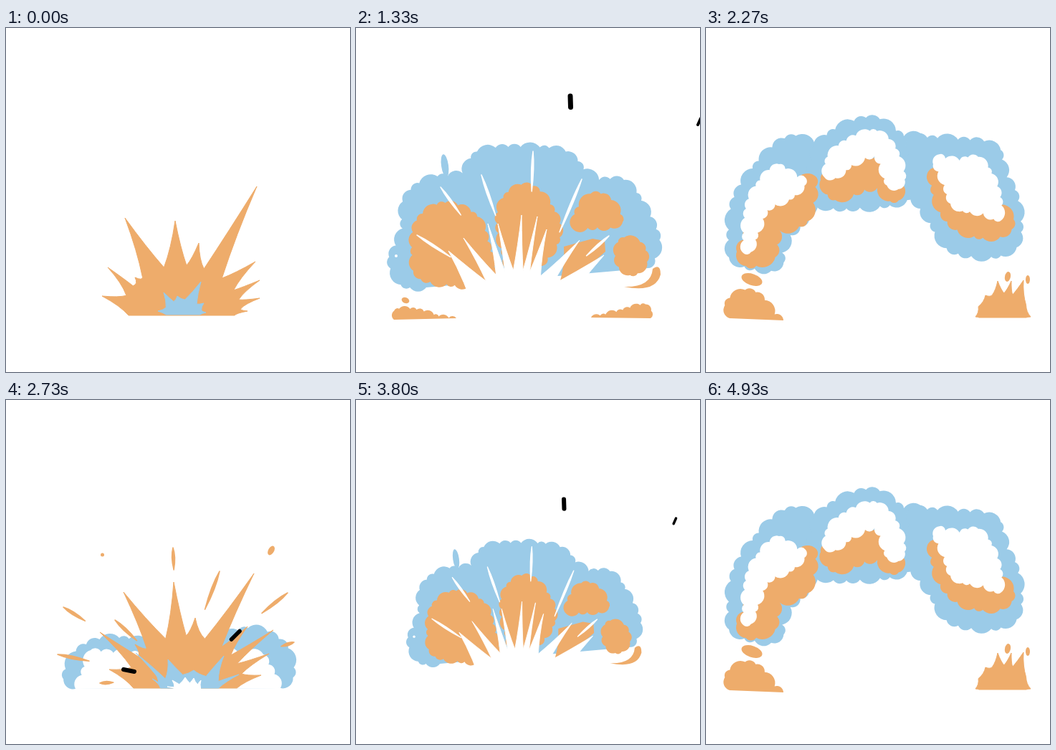
Animation, 480 px wide and 480 px high, one loop 4990 ms. Source, as an HTML page:

```html
<!DOCTYPE html>
<html lang="en">
<head>
<meta charset="utf-8">
<title>Cartoon explosion</title>
<style>
  html, body { margin: 0; width: 100%; height: 100%; overflow: hidden; background: #fff; }
  svg { display: block; width: 100vw; height: 100vh; }
</style>
</head>
<body>
<svg id="stage" viewBox="0 0 480 480"></svg>
<script>
const ORANGE = '#eeac6b', BLUE = '#9bcbe8', WHITE = '#fff', BLACK = '#000';
const LOOP = 4990, FRAME = 200 / 3, CYCLE = 13, HOLD = 2;
const CORE = [240, 390];

const parse = text => text.split(' ').map(p => p.split(',').map(Number));
const mix = (a, b, t) => a.map((v, i) => v + (b[i] - v) * t);
const distance = (a, b) => Math.hypot(b[0] - a[0], b[1] - a[1]);
const path = (fill, d) => `<path fill="${fill}" d="${d}"/>`;
const group = (transform, content) => `<g transform="${transform}">${content}</g>`;
const oval = (fill, x, y, rx, ry = rx, turn = 0) =>
  `<ellipse fill="${fill}" rx="${rx}" ry="${ry}" transform="translate(${x} ${y}) rotate(${turn})"/>`;
const balls = (fill, text) => parse(text).map(b => oval(fill, ...b)).join('');
const bar = (x1, y1, x2, y2, w) =>
  `<path stroke="${BLACK}" stroke-width="${w}" stroke-linecap="round" d="M${x1} ${y1}L${x2} ${y2}"/>`;

// Catmull-Rom curve through the key points, as a dense polyline.
function smooth(keys, parts = 12) {
  const line = [keys[0]];
  for (let i = 0; i < keys.length - 1; i++) {
    const b = keys[i], c = keys[i + 1], a = keys[i - 1] || b, d = keys[i + 2] || c;
    for (let s = 1; s <= parts; s++) {
      const t = s / parts;
      line.push(b.map((v, k) => v + t / 2 * (c[k] - a[k]
        + t * (2 * a[k] - 5 * v + 4 * c[k] - d[k] + t * (3 * (v - c[k]) + d[k] - a[k])))));
    }
  }
  return line;
}

// Cloud: the curve is cut into uneven bumps, each drawn as an outward arc.
function cloud(fill, bump, text) {
  const line = smooth(parse(text));
  const along = [0];
  let area = 0;
  line.forEach((p, i) => {
    const q = line[(i + 1) % line.length];
    area += p[0] * q[1] - q[0] * p[1];
    if (i) along.push(along[i - 1] + distance(line[i - 1], p));
  });
  const total = along[along.length - 1], count = Math.round(total / bump);
  const sweep = area > 0 ? 1 : 0;
  let last = line[0], d = `M${last}`;
  for (let i = 1; i <= count; i++) {
    const goal = i < count ? total * (i + 0.2 * Math.sin(2.4 * i)) / count : total;
    const j = Math.max(1, along.findIndex(v => v >= goal));
    const p = mix(line[j - 1], line[j], (goal - along[j - 1]) / (along[j] - along[j - 1]));
    const r = 0.62 * distance(last, p);
    d += `A${r} ${r} 0 0 ${sweep} ${p}`;
    last = p;
  }
  return path(fill, d + 'Z');
}

// Half-round fan of spikes; the valleys lie on an ellipse halfway between the tips.
function spikes(fill, cx, cy, rx, ry, text) {
  const centre = [cx, cy], tips = parse(text);
  const angle = ([x, y]) => Math.atan2(y - cy, x - cx);
  const bend = (tip, valley) => mix(mix(tip, valley, 0.5), mix(tip, centre, 0.5), 0.18);
  let valley = [cx - 0.88 * rx, cy], d = `M${valley}`;
  tips.forEach((tip, i) => {
    d += `Q${bend(tip, valley)} ${tip}`;
    if (i < tips.length - 1) {
      const a = (angle(tip) + angle(tips[i + 1])) / 2;
      valley = [cx + rx * Math.cos(a), cy + ry * Math.sin(a)];
    } else valley = [cx + 0.88 * rx, cy];
    d += `Q${bend(tip, valley)} ${valley}`;
  });
  return `<path fill="${fill}" stroke="${fill}" stroke-linejoin="round" d="${d}Z"/>`;
}

// Streaks that point at the core; each has an outer tip and a length.
const rays = (fill, width, text) => parse(text).map(([x, y, len]) => {
  const tip = [x, y], reach = distance(tip, CORE);
  const end = mix(tip, CORE, len / reach), wide = mix(tip, CORE, 0.4 * len / reach);
  const nx = (y - CORE[1]) / reach * width, ny = (CORE[0] - x) / reach * width;
  return `<path fill="${fill}" stroke="${fill}" stroke-width="1.5" stroke-linejoin="round" d="M${tip}Q${wide[0] + nx} ${wide[1] + ny} ${end}Q${wide[0] - nx} ${wide[1] - ny} ${tip}Z"/>`;
}).join('');

const spark =
  spikes(ORANGE, 245, 401, 84, 70, '134,374 142,334 180,348 166,265 236,269 269,300 350,221 348,326 354,352 354,377 337,395') +
  spikes(BLUE, 247, 400, 27, 21, '212,395 220,369 239,374 272,354 276,384 279,397');

const burst =
  cloud(BLUE, 21, '97,403 80,392 95,353 135,333 185,335 235,345 300,330 350,318 395,348 400,390 383,402') +
  cloud(WHITE, 19, '97,403 108,378 118,349 155,353 340,352 367,370 383,402') +
  spikes(ORANGE, 250, 402, 82, 73, '144,376 131,324 180,341 164,268 234,254 264,304 346,242 337,316 373,321 367,354 356,384') +
  spikes(BLUE, 256, 402, 46, 19, '204,389 205,377 181,353 226,362 262,377 304,357 325,383') +
  spikes(WHITE, 254, 403, 20, 8, '225,400 232,391 250,387 262,388 272,391') +
  rays(ORANGE, 4, '80,289,36 233,206,31 298,239,57 393,269,46 72,355,45 152,307,42 402,338,19 131,395,19') +
  oval(ORANGE, 134.5, 216, 2.5) + oval(ORANGE, 370, 210, 4, 7, 30) +
  bar(164, 376, 179, 379, 6) + bar(314.5, 334, 326, 322.5, 5.5);

const blast =
  cloud(BLUE, 20, '98,362 62,358 46,322 64,288 66,240 100,210 148,203 170,172 235,166 296,174 330,210 374,212 402,248 424,300 408,335') +
  oval(BLUE, 124, 192, 5, 16, -8) +
  cloud(ORANGE, 17, '157,361 90,350 79,322 84,270 124,244 170,264 184,300 196,347') +
  cloud(ORANGE, 17, '212,337 197,275 207,235 240,218 270,245 285,290 248,345') +
  cloud(ORANGE, 18, '302,280 306,258 328,231 356,240 372,275 340,278 302,280') +
  cloud(ORANGE, 18, '362,318 370,293 400,302 404,335 374,344 362,318') +
  path(ORANGE, 'M278 372Q292 340 290 305L330 294L347 297L348 312Q322 335 278 372Z') +
  spikes(WHITE, 225, 400, 66, 62, '129,311 150,293 184,273 198,273 231,261 253,263 266,281 312,296 346,317') +
  path(ORANGE, 'M374 361Q412 362 414 336Q425 328 425 344Q418 370 374 361Z') +
  rays(WHITE, 3, '118,222,48 175,205,60 247,172,56 315,211,80 353,290,42 85,289,56') +
  oval(WHITE, 56, 318, 2);

const blastGround =
  cloud(ORANGE, 11, '53,407 55,393 85,393 118,403 140,405') +
  oval(ORANGE, 69, 380, 5.5, 4, 20) +
  cloud(ORANGE, 12, '328,404 360,397 400,386 411,389 411,405');

const blastDebris = bar(299, 95, 299.5, 110.5, 7) + bar(481, 126, 477, 135, 4);

const ring =
  cloud(BLUE, 21, '32,320 40,235 106,156 156,168 148,255 108,300 105,337 50,332 32,320') +
  cloud(BLUE, 21, '150,165 185,139 235,125 278,152 310,155 290,232 235,249 150,243 150,165') +
  cloud(BLUE, 21, '285,152 340,155 405,163 415,200 434,235 437,300 400,319 338,309 308,262 285,230 285,152') +
  cloud(ORANGE, 22, '43,312 55,332 95,322 103,282 140,272 152,225 147,206 90,240 43,312') +
  cloud(ORANGE, 20, '160,212 180,240 235,222 260,243 278,225 240,185 180,195 160,212') +
  cloud(ORANGE, 20, '312,198 322,247 348,280 390,293 423,285 424,258 360,210 312,198') +
  cloud(WHITE, 16, '52,314 59,240 98,191 120,207 143,211 118,238 85,255 62,314 52,314') +
  cloud(WHITE, 16, '165,208 175,172 232,143 264,168 277,215 255,224 238,180 205,190 185,208 165,208') +
  cloud(WHITE, 16, '317,190 324,176 345,187 380,180 406,220 412,268 385,258 345,250 330,210 317,190') +
  cloud(ORANGE, 20, '33,405 25,390 45,367 74,371 92,396 108,408') +
  oval(ORANGE, 64, 351, 15, 8, 18) +
  spikes(ORANGE, 414, 404, 38, 34, '376,403 390,373 407,353 426,353 443,352 453,403') +
  oval(ORANGE, 421, 347, 4, 7, 12) + oval(ORANGE, 449, 351, 3, 6);

const wispOuter =
  oval(BLUE, 70, 178, 36, 37) +
  cloud(BLUE, 30, '16,301 -8,285 -4,218 30,188 100,172 119,186 115,211') +
  cloud(BLUE, 28, '130,194 133,163 165,131 210,114 262,132 280,180 266,235') +
  cloud(BLUE, 28, '312,181 326,154 375,146 423,164 449,205 438,265');
const wispInner =
  cloud(WHITE, 23, '16,300 4,268 20,227 50,211 66,184 112,193 115,212') +
  cloud(WHITE, 20, '130,194 150,160 205,139 249,160 264,198 266,236') +
  cloud(WHITE, 20, '312,182 345,177 385,172 422,198 435,238 438,266');
const embers = balls(ORANGE,
  '75,223,11,9 90,220,9 94,232,8 36,257,8 22,272,13,10 5,336,12 31,352,8.5,6,18 ' +
  '168,177,13,10,-15 187,173,11 207,169,13,11 225,180,11 224,195,9,11') +
  balls(ORANGE,
  '345,202,12,14 371,201,19,18 396,208,11,14 412,222,15,16 403,240,9,7 ' +
  '424,334,9 437,349,11 415,347,11 432,355,10 447,327,3.5,8,15') +
  path(ORANGE, 'M425 304Q421 293 437 293Q448 297 449 306Q440 300 434 301Q431 306 425 304Z') +
  path(ORANGE, 'M393 365Q408 362 405 345L425 340L428 360Q418 372 402 370Q392 369 393 365Z');

const poses = [
  spark,
  burst,
  group('translate(235 405) scale(.86) translate(-235 -405)', blast + blastDebris),
  blast + blastGround + blastDebris,
  ring,
  wispOuter + wispInner + embers,
  wispOuter + group('translate(0 -8)', wispInner)
];

const stage = document.getElementById('stage');
stage.innerHTML = poses.map(p => `<g display="none">${p}</g>`).join('');
const layers = [...stage.children];

function render(ms) {
  const tick = Math.floor(ms % LOOP / 10) * 10;
  const step = Math.floor((tick + 4) / FRAME);
  const current = Math.floor(step % CYCLE / HOLD);
  layers.forEach((layer, i) => layer.setAttribute('display', i === current ? 'inline' : 'none'));
}

const start = performance.now();
function loop() {
  render(performance.now() - start);
  requestAnimationFrame(loop);
}
loop();
</script>
</body>
</html>
```
